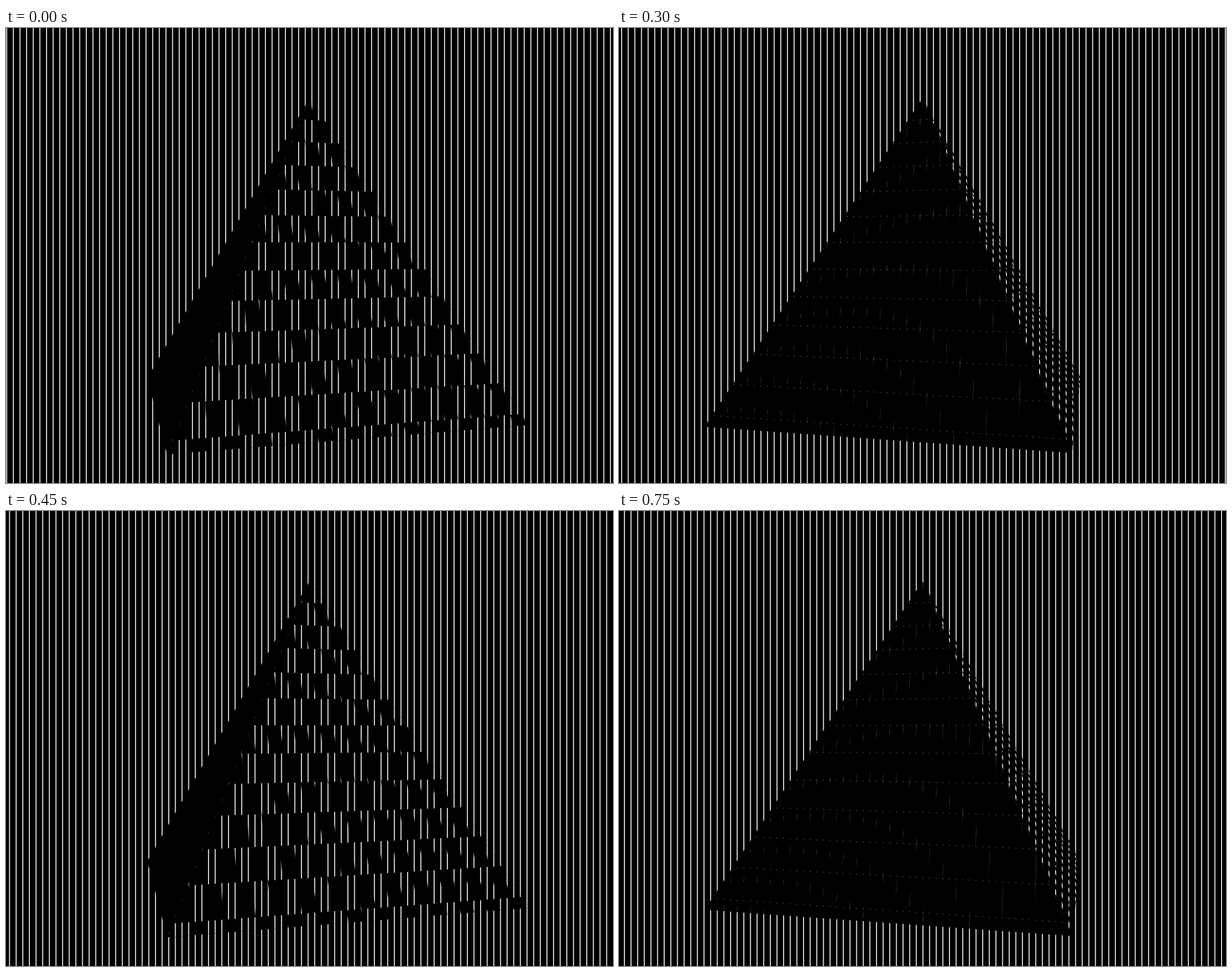
These frames come from a looping animation (864x648 px, 900 ms). An HTML page with a canvas:

```html
<!DOCTYPE html>
<html lang="en">
<head>
<meta charset="utf-8">
<title>Barrier-grid pyramid</title>
<style>
  html, body { margin: 0; width: 100%; height: 100%; overflow: hidden; background: #000; }
  canvas { display: block; }
</style>
</head>
<body>
<canvas id="stage" width="864" height="648"></canvas>
<script>
const W = 864, H = 648;
const STEP_MS = 150, STEPS = 6, POSES = 3;
const SLIT = { start: 0.35, shift: 4 / 3, pitch: 9.444, width: 1.3 };
const ROWS = 12.35, COLS = 24.7, COL_OFFSET = 0.57;
const APEX = { x: 432, y: 100, w: 1.015 };
const ctx = document.getElementById('stage').getContext('2d');

// Base corner in perspective; 90 degrees points at the viewer.
function corner(degrees) {
  const a = degrees * Math.PI / 180;
  const depth = Math.sin(a);
  const w = 1 - 0.31 * depth;
  return { x: 432 + 304 * Math.cos(a) / w, y: 527 + 67 * depth / w, w };
}

// Maps texture coordinates (u across, t from apex to base) to the screen.
function faceMap(left, right) {
  return (u, t) => {
    const across = u - 0.5;
    const a = (1 - t) * APEX.w;
    const l = (t / 2 - across) * left.w;
    const r = (t / 2 + across) * right.w;
    const sum = a + l + r;
    return {
      x: (a * APEX.x + l * left.x + r * right.x) / sum,
      y: (a * APEX.y + l * left.y + r * right.y) / sum
    };
  };
}

function trace(points) {
  ctx.beginPath();
  points.forEach(p => ctx.lineTo(p.x, p.y));
  ctx.closePath();
}

function inFace(left, right, paint) {
  ctx.save();
  trace([APEX, left, right]);
  ctx.fillStyle = '#000';
  ctx.fill();
  ctx.clip();
  paint(faceMap(left, right));
  ctx.restore();
}

const columnEdge = c => (c - COL_OFFSET) / COLS;

function paintChecks(map) {
  ctx.fillStyle = '#fff';
  for (let row = 0; row < ROWS; row++) {
    const top = row / ROWS, bottom = Math.min(1, (row + 1) / ROWS);
    for (let col = 0; col <= COLS + 1; col++) {
      if ((row + col) % 2 === 0) continue;
      const u0 = columnEdge(col), u1 = columnEdge(col + 1);
      trace([map(u0, top), map(u1, top), map(u1, bottom), map(u0, bottom)]);
      ctx.fill();
    }
  }
}

function paintSeams(map) {
  const seam = (p, q) => {
    ctx.beginPath();
    ctx.moveTo(p.x, p.y);
    ctx.lineTo(q.x, q.y);
    ctx.stroke();
  };
  ctx.strokeStyle = 'rgba(255, 255, 255, 0.5)';
  ctx.lineWidth = 0.8;
  for (let row = 1; row < ROWS; row++) seam(map(0, row / ROWS), map(1, row / ROWS));
  ctx.lineWidth = 0.4;
  for (let col = 1; col <= COLS; col++) {
    const u = columnEdge(col);
    seam(map(u, 0), map(u, 1));
  }
}

function coverBetweenSlits(step) {
  ctx.fillStyle = '#000';
  let edge = 0;
  for (let x = SLIT.start + step * SLIT.shift; x < W - 0.5; x += SLIT.pitch) {
    ctx.fillRect(edge, 0, x - edge, H);
    edge = x + SLIT.width;
  }
  ctx.fillRect(edge, 0, W - edge, H);
}

function draw(step) {
  const pose = step % POSES;
  const angle = 119.1 - 30 * pose;
  const left = corner(angle + 90), front = corner(angle), right = corner(angle - 90);
  ctx.fillStyle = '#fff';
  ctx.fillRect(0, 0, W, H);
  inFace(front, right, paintChecks);
  inFace(left, front, pose === 2 ? paintSeams : () => {});
  coverBetweenSlits(step);
}

let shown = -1;
function tick(now) {
  const step = Math.floor(now / STEP_MS) % STEPS;
  if (step !== shown) draw(shown = step);
  requestAnimationFrame(tick);
}
draw(0);
requestAnimationFrame(tick);
</script>
</body>
</html>
```
